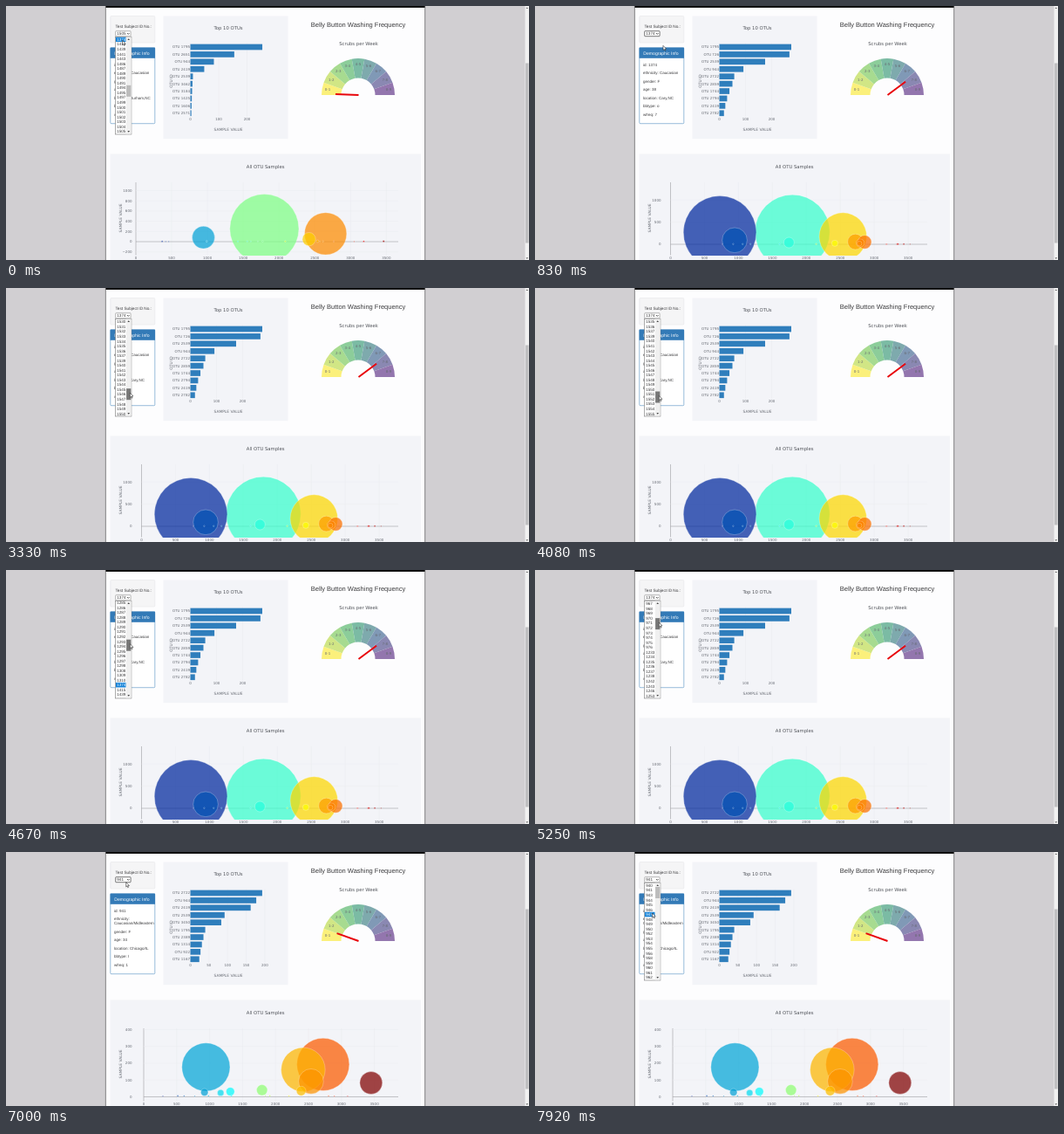
Animation, 600 px wide and 291 px high, one loop 8000 ms. Source, as an HTML page:

```html
<!DOCTYPE html>
<html lang="en">
<head>
<meta charset="utf-8">
<title>Belly button dashboard</title>
<style>
html, body { margin: 0; width: 100%; height: 100%; overflow: hidden; background: #d1cfd2; }
svg { display: block; width: 600px; height: 291px; }
text { font-family: "Liberation Sans", Arial, sans-serif; fill: #3a3a3c; text-rendering: geometricPrecision; white-space: pre; }
.plot { font-family: "DejaVu Sans", Verdana, sans-serif; fill: #666a72; }
</style>
</head>
<body>
<svg viewBox="0 0 600 291">
  <defs>
    <clipPath id="plotArea"><rect x="147" y="202" width="303" height="84"/></clipPath>
    <clipPath id="menuArea"><rect x="125.8" y="35.5" width="17.8" height="111.2"/></clipPath>
  </defs>
  <g id="page"></g><g id="charts"></g><g id="overlay"></g>
</svg>
<script>
const CARD = '#f3f4f8', GRID = '#e8eaef', AXIS = '#8c8c90', BLUE = '#337ab7';

const ids = ('940-941 943-950 952-956 958-964 966-976 1233-1238 1242-1243 1246 1253-1260 1275-1298 1308-1310 ' +
  '1374 1415 1439 1441 1443 1486-1487 1489-1491 1494-1495 1497 1499-1522 1530-1537 1539-1571')
  .split(' ').flatMap(range => {
    const [from, to = from] = range.split('-').map(Number);
    return Array.from({ length: to - from + 1 }, (_, i) => from + i);
  });

// Sample values are the leading counts, then a tail that shrinks by a fixed ratio.
const subjects = {
  1505: {
    info: ['id: 1505', 'ethnicity: Caucasian', 'gender: M', 'age: 29', 'location: Durham,NC', 'bbtype: I', 'wfreq: 0'],
    otus: [1795, 2651, 944, 2419, 2539, 3462, 3184, 1425, 1606, 2571],
    head: [254, 155, 83, 49, 9], decay: .83, angle: 2, barScale: .325, barStep: 100,
    x0: 149, xScale: .0821, y0: 270, yScale: .0585, yStep: 200, yMin: -1, yMax: 5, idMin: 50, idMax: 3570
  },
  1374: {
    info: ['id: 1374', 'ethnicity: Caucasian', 'gender: F', 'age: 38', 'location: Cary,NC', 'bbtype: o', 'wfreq: 7'],
    otus: [1795, 726, 2539, 944, 2722, 2859, 1744, 2794, 2419, 2782],
    head: [275, 268, 175, 92, 57, 50], decay: .77, angle: 144, barScale: .3, barStep: 100,
    x0: 155.5, xScale: .0779, y0: 273, yScale: .0508, yStep: 500, yMin: 0, yMax: 2, idMin: 465, idMax: 3594
  },
  941: {
    info: ['id: 941', 'ethnicity:', 'Caucasian/Midleastern', 'gender: F', 'age: 34', 'location: Chicago/IL', 'bbtype: I', 'wfreq: 1'],
    otus: [2722, 944, 2419, 2539, 3450, 1795, 2389, 1314, 922, 1167],
    head: [193, 177, 162, 92, 83, 40], decay: .88, angle: 20, barScale: .427, barStep: 50,
    x0: 158, xScale: .0756, y0: 280.5, yScale: .1925, yStep: 100, yMin: 0, yMax: 4, idMin: 57, idMax: 3450
  }
};
for (const s of Object.values(subjects)) {
  const { head, decay } = s;
  s.values = s.otus.map((_, i) => head[i] ?? head.at(-1) * decay ** (i - head.length + 1));
}

// Linear interpolation through [position, ...values] keys.
function track(keys, t) {
  const next = keys.findIndex(key => key[0] > t);
  if (next < 0) return keys.at(-1).slice(1);
  if (next === 0) return keys[0].slice(1);
  const a = keys[next - 1], b = keys[next], k = (t - a[0]) / (b[0] - a[0]);
  return a.slice(1).map((v, i) => v + (b[i + 1] - v) * k);
}

const jet = [[0, 0, 0, 131], [.125, 0, 60, 170], [.375, 5, 255, 255], [.625, 255, 255, 0], [.875, 250, 0, 0], [1, 128, 0, 0]];
const viridis = [[0, 251, 240, 123], [.3, 150, 215, 148], [.5, 123, 187, 164], [.75, 128, 153, 182], [1, 147, 118, 174]];
const shade = (ramp, t) => `rgb(${track(ramp, t).map(Math.round)})`;

const rect = (x, y, w, h, fill, extra = '') => `<rect x="${x}" y="${y}" width="${w}" height="${h}" fill="${fill}" ${extra}/>`;
const line = (x1, y1, x2, y2, stroke, width = .5) =>
  `<path d="M${x1} ${y1}L${x2} ${y2}" stroke="${stroke}" stroke-width="${width}"/>`;
// y is the vertical middle of the line of text.
const text = (x, y, size, str, extra = '') =>
  `<text x="${x}" y="${y + size * .36}" font-size="${size}" ${extra}>${str}</text>`;
const plotText = (x, y, size, str, anchor = 'middle', extra = '') =>
  text(x, y, size, str, `class="plot" text-anchor="${anchor}" ${extra}`);
const title = (x, y, str) => plotText(x, y, 5.3, str, 'middle', 'style="fill:#505359"');
const turned = (x, y, str) => plotText(x, y, 4.4, str, 'middle', `transform="rotate(-90 ${x} ${y})"`);
const layer = id => document.getElementById(id);

const onDial = (r, deg) => {
  const a = deg * Math.PI / 180;
  return [404 - r * Math.cos(a), 102 - r * Math.sin(a)];
};

function drawGauge() {
  let out = '';
  for (let i = 0; i < 9; i++) {
    const a = i * 20, b = a + 20;
    out += `<path fill="${shade(viridis, i / 8)}" d="M${onDial(42, a)}A42 42 0 0 1 ${onDial(42, b)}` +
      `L${onDial(19.5, b)}A19.5 19.5 0 0 0 ${onDial(19.5, a)}Z"/>` + plotText(...onDial(35.5, a + 10), 4, `${i}-${i + 1}`);
  }
  return out;
}

function drawPage() {
  layer('page').innerHTML =
    rect(115, -5, 365, 301, '#fdfdfe', 'style="filter:drop-shadow(0 0 1.3px #222)"') +
    rect(114.5, 0, 366, 1.9, '#000') +
    rect(595.5, 0, 4.5, 291, '#f1f1f1') + rect(596, 65.5, 3.6, 206, '#bfbfc1') +
    '<path d="M596.5 3l1.3-1.6 1.3 1.6zM596.5 288.3l1.3 1.6 1.3-1.6z" fill="#666"/>' +
    rect(119.8, 11.5, 51, 30.5, '#f5f5f6', 'rx="1" stroke="#e1e1e4" stroke-width=".5"') +
    text(125.5, 23.1, 4.7, 'Test Subject ID No.:') +
    rect(180.5, 11.5, 143, 140.8, CARD) + title(255, 25.2, 'Top 10 OTUs') +
    plotText(255, 141.9, 4.4, 'SAMPLE VALUE') + turned(189.3, 86, 'OTU ID') +
    text(404, 21.5, 7.5, 'Belly Button Washing Frequency', 'text-anchor="middle"') +
    title(404.5, 42.8, 'Scrubs per Week') + drawGauge() +
    rect(119.5, 169.5, 356.5, 122, CARD) + title(297.7, 183.8, 'All OTU Samples') +
    turned(131.2, 243, 'SAMPLE VALUE');
}

function drawInfo(lines) {
  let y = 67.2;
  const rows = lines.map(str => {
    const row = text(124, y, 4.5, str);
    y += str === 'ethnicity:' ? 5 : 9.5;
    return row;
  });
  return rect(119.8, 47.8, 51, y - 46.8, '#fff', `rx="1" stroke="${BLUE}" stroke-width=".5"`) +
    rect(119.6, 47.6, 51.4, 12.2, BLUE) + text(124.3, 53.7, 5.1, 'Demographic Info', 'style="fill:#fff"') + rows.join('');
}

function drawBars({ otus, values, barScale, barStep }) {
  let out = '';
  for (let v = 0; v * barScale < 87; v += barStep) {
    const x = 211.5 + v * barScale;
    out += line(x, 42.5, x, 127, GRID) + plotText(x, 129.8, 4, v);
  }
  otus.forEach((otu, i) => {
    const y = 47 + i * 8.42;
    out += rect(211.5, y - 3.35, values[i] * barScale, 6.7, '#2f7ebc') + plotText(211, y, 4, 'OTU ' + otu, 'end');
  });
  return out;
}

function drawBubbles({ otus, values, x0, xScale, y0, yScale, yStep, yMin, yMax, idMin, idMax }) {
  let out = '';
  for (let id = 0; id <= 3500; id += 500) {
    const x = x0 + id * xScale;
    out += line(x, 202, x, 285.5, id ? GRID : AXIS) + plotText(x, 288.7, 4, id);
  }
  for (let i = yMin; i <= yMax; i++) {
    const value = i * yStep, y = y0 - value * yScale;
    out += line(x0, y, 450, y, i ? GRID : AXIS) + plotText(144.5, y, 4, String(value).replace('-', '−'), 'end');
  }
  // Radius and height follow the sample value, colour follows the OTU id.
  const bubble = (id, value) =>
    `<circle cx="${x0 + id * xScale}" cy="${y0 - value * yScale}" r="${value * .156}" opacity=".72" ` +
    `fill="${shade(jet, (id - idMin) / (idMax - idMin))}" stroke="#fff" stroke-width=".35"/>`;
  const bubbles = otus.map((id, i) => bubble(id, values[i]));
  let seed = idMin;
  for (let i = 0; i < 12; i++) {
    seed = (seed * 1103 + 377) % 3169;
    bubbles.push(bubble(idMin + seed, 4 + i % 3));
  }
  return out + `<g clip-path="url(#plotArea)">${bubbles.join('')}</g>`;
}

function drawCharts(subject) {
  layer('charts').innerHTML = drawInfo(subject.info) + drawBars(subject) +
    line(404.5, 102, ...onDial(26, subject.angle), '#e8060c', 2) + drawBubbles(subject);
}

const PITCH = 5.54, DRAG_START = 2750, DRAG_END = 5600;
const dragKeys = [[DRAG_START, 58], [3550, 135], [3920, 135], [4670, 60.2], [5250, 23], [DRAG_END, 0]];
const arriveKeys = [[500, 133.5, 39.5], [1150, 160, 51], [1600, 139, 30], [2050, 139, 30], [2600, 141.5, 83.3]];
const leaveKeys = [[DRAG_END, 143, 45], [6100, 134.3, 44.8], [6600, 134.3, 44.8], [7150, 139, 31], [7400, 139, 31], [7900, 134.5, 70]];

const isOpen = t => t < 500 || (t >= 1750 && t < 6420) || t >= 7330;
const isDragging = t => t >= DRAG_START && t < DRAG_END;
const scrollTop = t => t < 500 ? 77 : track(dragKeys, t)[0];
const thumbY = top => 40 + top * .66;

function pointerAt(t) {
  if (isDragging(t)) return [142.3, thumbY(scrollTop(t)) + 5];
  return track(t < DRAG_START ? arriveKeys : leaveKeys, t);
}

function drawMenu(t, selected) {
  const top = scrollTop(t), [px, py] = pointerAt(t);
  const overList = px < 138 && py > 35.5;
  const lit = overList ? Math.floor(top + (py - 35.5) / PITCH) : ids.indexOf(selected);
  let rows = '';
  for (let i = Math.floor(top); i < top + 20 && i < ids.length; i++) {
    const y = 38.3 + (i - top) * PITCH;
    if (i === lit) rows += rect(125.8, y - PITCH / 2, 11.8, PITCH, '#1683d8');
    rows += text(127.2, y, 4.6, ids[i], `style="fill:${i === lit ? '#fff' : '#3a3a3c'}"`);
  }
  return rect(125.5, 35.2, 18.4, 111.8, '#fff', 'stroke="#777" stroke-width=".6"') +
    `<g clip-path="url(#menuArea)">${rows}</g>` + rect(137.8, 35.6, 5.8, 111, '#f0f0f0') +
    rect(138.1, thumbY(top), 5.2, 13, isDragging(t) ? '#787878' : '#bcbcbc') +
    '<path d="M139.4 39l1.3-1.7 1.3 1.7zM139.4 143l1.3 1.7 1.3-1.7z" fill="#444"/>';
}

function drawOverlay(t) {
  const selected = t < 500 ? 1505 : t < 6420 ? 1374 : 941;
  layer('overlay').innerHTML =
    rect(125.7, 28.7, 17.4, 6, '#fff', `rx=".6" stroke="${isOpen(t) ? '#888' : '#222'}" stroke-width=".6"`) +
    text(127.3, 31.7, 4.6, selected) +
    '<path d="M139 31l1.3 1.4 1.3-1.4" fill="none" stroke="#222" stroke-width=".7"/>' +
    (isOpen(t) ? drawMenu(t, selected) : '') +
    `<path transform="translate(${pointerAt(t)})" d="M0 0V5.2L1.2 4.1 2 6 2.8 5.6 2 3.8H3.7Z" fill="#fff" stroke="#111" stroke-width=".5"/>`;
}

let shown;
function frame(now) {
  const t = now % 8000;
  // The charts follow the menu after a short loading delay.
  const id = t < 660 ? 1505 : t < 6580 ? 1374 : 941;
  if (id !== shown) drawCharts(subjects[shown = id]);
  drawOverlay(t);
  requestAnimationFrame(frame);
}

drawPage();
frame(0);
</script>
</body>
</html>
```
